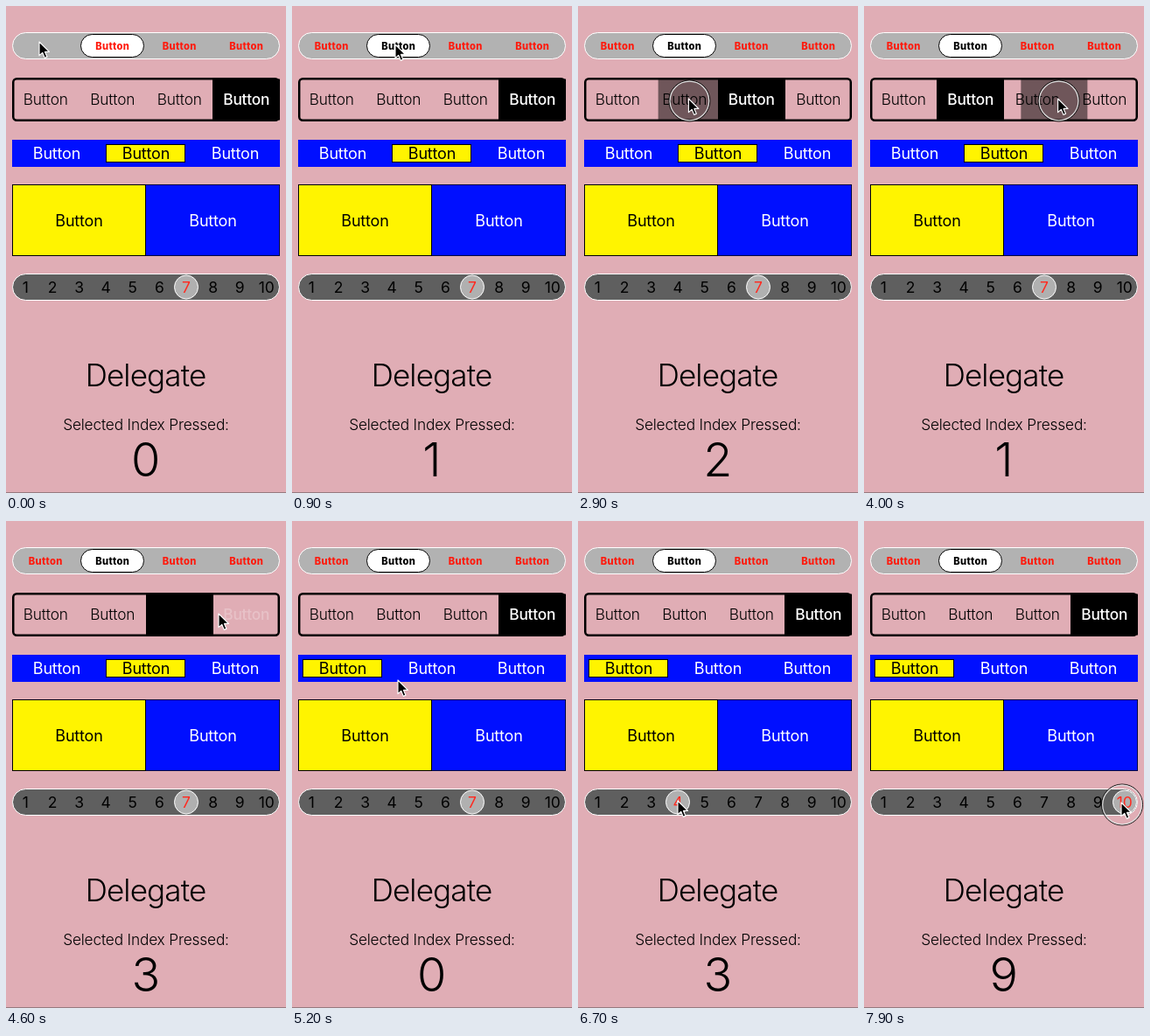
Write an HTML page that moves like this. It is 320 px wide and 557 px high and loops after 8000 ms.

```html
<!DOCTYPE html>
<html>
<head>
<meta charset="utf-8">
<style>
  html, body { margin: 0; width: 100%; height: 100%; overflow: hidden; background: #e0adb5; }
  svg { display: block; width: 320px; height: 557px; }
  text { font-family: Inter, sans-serif; text-anchor: middle; letter-spacing: -.01em; }
</style>
</head>
<body>
<svg viewBox="0 0 320 557"></svg>
<script>
const LOOP = 8000, SLIDE = 200, PRESS = 80, LEFT = 7, WIDTH = 306;
const BLUE = '#000fff', YELLOW = '#fff400';
const svg = document.querySelector('svg');

function set(node, attrs) {
  for (const key in attrs) node.setAttribute(key, attrs[key]);
  return node;
}
function add(tag, attrs, content = '') {
  const node = set(document.createElementNS('http://www.w3.org/2000/svg', tag), attrs);
  node.textContent = content;
  svg.append(node);
  return node;
}
const box = (x, y, width, height, rx, fill, stroke = 'none', line = 1) =>
  add('rect', { x, y, width, height, rx, fill, stroke, 'stroke-width': line });
const label = (x, capCenter, size, content, weight = 400, spacing = -.01) =>
  add('text', {
    x, y: capCenter + size * .364, 'font-size': size, 'font-weight': weight,
    style: `letter-spacing:${spacing}em`,
  }, content);

const rows = [
  { y: 30, h: 31, n: 4, first: 1, size: 11.2, weight: 800, spacing: .035, bg: '#b2b2b2', edge: '#fff', round: 15,
    thumb: { w: 72, h: 26, r: 13, fill: '#fff', edge: '#000' }, ink: '#ff1a0d', on: '#000' },
  { y: 82, h: 50, n: 4, first: 3, size: 17.3, weight: 300, onWeight: 500, bg: 'none', edge: '#000', round: 4, line: 2.5,
    thumb: { w: 76, h: 46, r: 0, fill: '#000', edge: '#000' }, ink: '#000', on: '#fff' },
  { y: 153, h: 31, n: 3, first: 1, size: 18, bg: BLUE, edge: BLUE, round: 0,
    thumb: { w: 90, h: 20, r: 0, fill: YELLOW, edge: '#000' }, ink: '#fff', on: '#000' },
  { y: 204, h: 82, n: 2, first: 0, size: 18, bg: BLUE, edge: '#000840', round: 0,
    thumb: { w: 152, h: 81, r: 0, fill: YELLOW, edge: '#000' }, ink: '#fff', on: '#000' },
  { y: 306, h: 31, n: 10, first: 6, size: 17.5, bg: '#5f5f5f', edge: '#fff', round: 15,
    thumb: { w: 27, h: 27, r: 13.5, fill: '#b0b0b0', edge: '#fff' }, ink: '#000', on: '#ff2a20' },
];
const center = (row, index) => LEFT + WIDTH / row.n * (index + .5);

// Each gesture ends at [time, x, y]; the button under it becomes selected.
const gestures = [
  [0, 38, 41], [600, 118, 44], [1600, 128, 117], [2300, 195, 106], [3160, 126, 106, 'drag'],
  [4500, 243, 106, 'drag'], [4900, 62, 158], [5500, 180, 206], [5730, 130, 231],
  [6400, 114, 320], [7560, 294, 322, 'hold'],
].map(([time, x, y, kind]) => {
  const row = rows.find(r => y >= r.y && y < r.y + r.h);
  return { time, x, y, kind, row, index: Math.floor((x - LEFT) / WIDTH * row.n) };
});

let ghost;
for (const row of rows) {
  const middle = row.y + row.h / 2, line = row.line || 1, { thumb } = row;
  row.taps = [{ time: -LOOP, index: row.first }, ...gestures.filter(g => g.row === row)];
  box(LEFT + line / 2, row.y + line / 2, WIDTH - line, row.h - line, row.round, row.bg, row.edge, line);
  if (row === rows[1]) ghost = box(0, 84, 76, 46, 0, 'rgba(0,0,0,.5)');
  row.knob = box(0, middle - thumb.h / 2, thumb.w, thumb.h, thumb.r, thumb.fill, thumb.edge);
  row.labels = Array.from({ length: row.n }, (_, i) =>
    label(center(row, i), middle, row.size, row.n === 10 ? i + 1 : 'Button', row.weight, row.spacing));
}

label(159.5, 422, 35, 'Delegate', 350, -.025);
label(160, 479, 17.3, 'Selected Index Pressed:', 350);
const counter = label(159.5, 518.5, 54, '0', 350);
box(0, 556, 320, 1, 0, '#96797f');

const ripple = [add('circle', { r: 23.5, fill: 'none', stroke: '#111' }),
                add('circle', { r: 22.3, fill: 'none', stroke: '#ddd', 'stroke-width': 1.2 })];
const cursor = add('path', {
  d: 'M0 0V14L3.3 11L5.6 16.4L8 15.4L5.8 10.2H10.2Z',
  fill: '#000', stroke: '#fff', 'stroke-linejoin': 'round',
});

const clamp = p => Math.max(0, Math.min(1, p));
const ease = p => p * p * (3 - 2 * p);
const show = (node, visible) => set(node, { visibility: visible ? 'visible' : 'hidden' });

function drawRow(row, t) {
  const at = row.taps.findLastIndex(tap => tap.time <= t);
  const { time, index } = row.taps[at];
  const from = row.taps[Math.max(0, at - 1)].index;
  const p = clamp((t - time) / SLIDE);
  const x = center(row, from + (index - from) * ease(p)) - row.thumb.w / 2;
  set(row.knob, { x: Math.ceil(x) - .5 });
  row.labels.forEach((node, i) => {
    const on = i === index;
    set(node, {
      fill: on ? row.on : row.ink,
      opacity: on ? p * p : 1,
      'font-weight': on && row.onWeight || row.weight || 400,
    });
  });
}

function draw(t) {
  rows.forEach(row => drawRow(row, t));
  const last = gestures.findLastIndex(g => g.time <= t);
  const prev = gestures[last], next = gestures[last + 1] || { ...prev, time: LOOP, kind: '' };
  counter.textContent = prev.index;

  // The cursor rests after a gesture, travels, and rests again before the next one.
  const progress = (t - prev.time) / (next.time - prev.time);
  const travel = clamp((progress - .3) / .4);
  const x = prev.x + (next.x - prev.x) * travel;
  const y = prev.y + (next.y - prev.y) * travel;
  set(cursor, { transform: `translate(${x} ${y}) scale(1.12)` });

  const dragging = next.kind === 'drag' && progress > .25;
  const pressed = dragging || prev.kind === 'hold' || t > next.time - PRESS && next.time < LOOP;
  for (const ring of ripple) show(set(ring, { cx: x + 1, cy: y + 2.5 }), pressed);
  show(ghost, dragging);
  if (dragging) set(ghost, { x: center(rows[1], prev.index) + x - prev.x - 38 });
}

let begin;
function frame(now) {
  begin ??= now;
  draw(Math.max(0, now - begin) % LOOP);
  requestAnimationFrame(frame);
}
draw(0);
requestAnimationFrame(frame);
</script>
</body>
</html>
```
